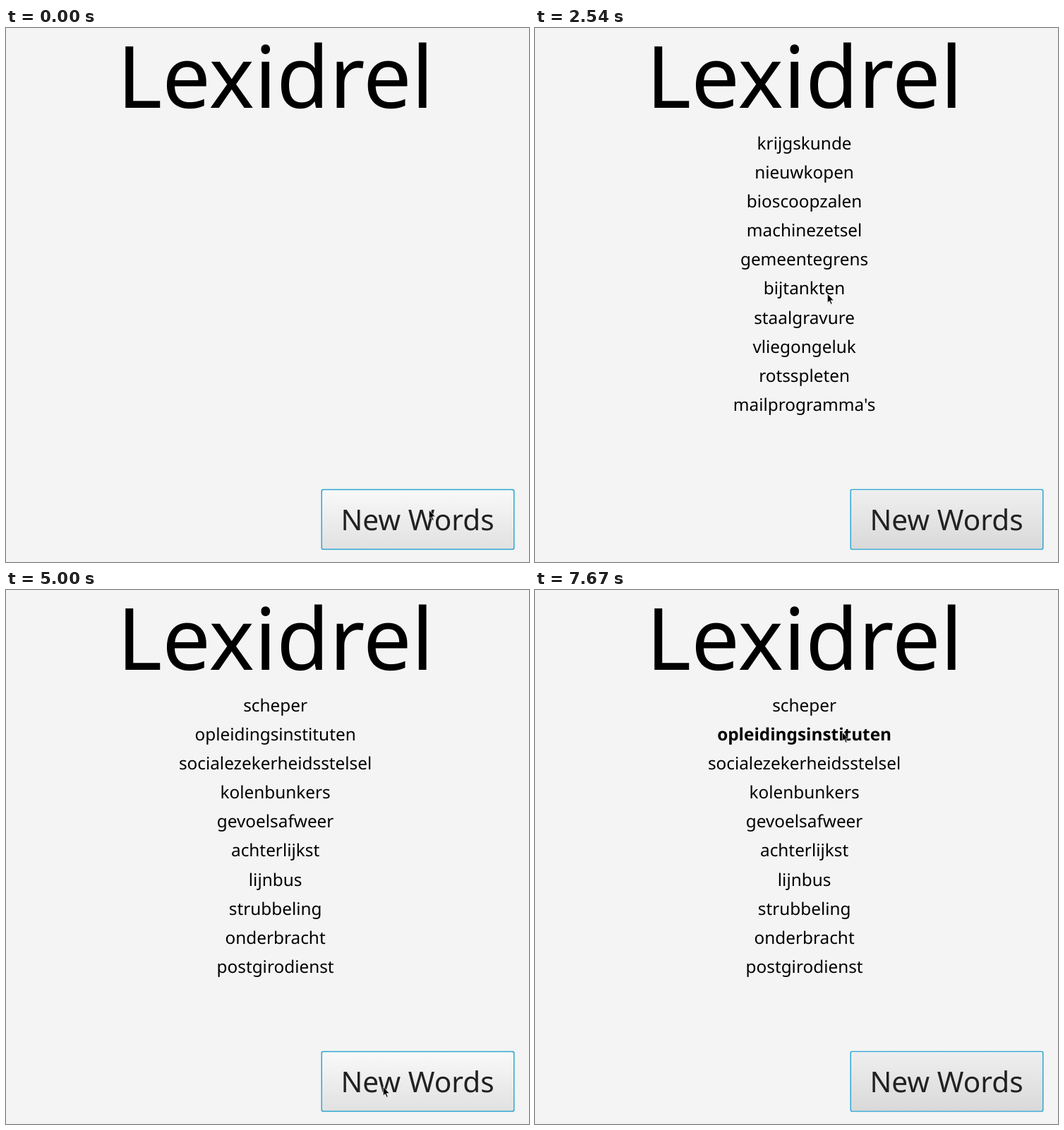
Write an HTML page that moves like this. It is 741 px wide and 756 px high and loops after 8 s.

```html
<!DOCTYPE html>
<html lang="en">
<head>
<meta charset="utf-8">
<title>New Words</title>
<style>
html, body { margin: 0; width: 741px; height: 756px; overflow: hidden; background: #f4f4f4; }
svg { display: block; }
text {
  font-family: "Noto Sans", "Open Sans", sans-serif;
  text-anchor: middle;
  text-rendering: geometricPrecision;
}
.title { font-size: 121.7px; }
.list { font-size: 24.33px; }
.label { font-size: 40.6px; fill: #212121; }

/* Everything changes in hard steps on one 8 s clock. */
.list, .idle, .armed, .cursor, .picked { animation: 8s step-end infinite; }
.first { animation-name: first; }
.second { animation-name: second; }
.idle { animation-name: idle; }
.armed { animation-name: armed; }
.cursor { animation-name: move; }
.first .picked { animation-name: pick-first; }
.second .picked { animation-name: pick-second; }

@keyframes first { 0%, 61.75%, 100% { opacity: 0 } 8.375% { opacity: 1 } }
@keyframes second { 0% { opacity: 0 } 61.75%, 100% { opacity: 1 } }
@keyframes pick-first { 0% { font-weight: 400 } 38.75%, 100% { font-weight: 700 } }
@keyframes pick-second { 0% { font-weight: 400 } 95.875%, 100% { font-weight: 700 } }
@keyframes armed {
  0%, 8.375%, 61.75%, 100% { opacity: 0 }
  6.25%, 59.625% { opacity: 1 }
}
@keyframes idle {
  0%, 47.5% { opacity: 0 }
  21.25%, 71.625%, 100% { opacity: 1 }
}
@keyframes move {
  0% { transform: translate(599px, 682px) }
  20% { transform: translate(591px, 681px) }
  21.25% { transform: translate(545px, 605px) }
  22.125% { transform: translate(470px, 500px) }
  23.375% { transform: translate(406px, 412px) }
  24.625% { transform: translate(410px, 393px) }
  26.75% { transform: translate(411px, 391px) }
  27.75% { transform: translate(411px, 388px) }
  28.75% { transform: translate(412px, 385px) }
  29.75% { transform: translate(413px, 381px) }
  30.75% { transform: translate(414px, 378px) }
  31.75% { transform: translate(414px, 376px) }
  45% { transform: translate(430px, 430px) }
  45.875% { transform: translate(468px, 545px) }
  46.625% { transform: translate(505px, 630px) }
  47.5% { transform: translate(524px, 666px) }
  49.25% { transform: translate(528px, 682px) }
  50.25% { transform: translate(532px, 695px) }
  51.25% { transform: translate(534px, 703px) }
  69.625% { transform: translate(531px, 693px) }
  70.625% { transform: translate(520px, 655px) }
  71.625% { transform: translate(488px, 545px) }
  72.625% { transform: translate(452px, 430px) }
  73.625% { transform: translate(423px, 335px) }
  74.625% { transform: translate(407px, 286px) }
  75.5% { transform: translate(390px, 290px) }
  76.5% { transform: translate(374px, 300px) }
  77.375% { transform: translate(369px, 312px) }
  78.375% { transform: translate(380px, 320px) }
  79.25% { transform: translate(397px, 322px) }
  80.5% { transform: translate(420px, 310px) }
  81.5% { transform: translate(445px, 285px) }
  82.5% { transform: translate(457px, 250px) }
  83.5% { transform: translate(456px, 220px) }
  84.5% { transform: translate(450px, 200px) }
  85.5% { transform: translate(446px, 191px) }
  87.5%, 100% { transform: translate(435px, 201px) }
}
</style>
</head>
<body>
<svg width="741" height="756" viewBox="0 0 741 756">
  <defs>
    <linearGradient id="hover" x2="0" y2="1"><stop stop-color="#f9f9f9"/><stop offset="1" stop-color="#e1e1e1"/></linearGradient>
    <linearGradient id="idle" x2="0" y2="1"><stop stop-color="#efefef"/><stop offset="1" stop-color="#d9d9d9"/></linearGradient>
    <linearGradient id="armed" x2="0" y2="1"><stop stop-color="#e2e2e2"/><stop offset="1" stop-color="#cbcbcb"/></linearGradient>
  </defs>

  <text class="title" x="381.8" y="112.5">Lexidrel</text>
  <g class="list first"></g>
  <g class="list second"></g>

  <rect x="446.5" y="652.7" width="274" height="86" rx="2.6" fill="#2fa6d2"/>
  <g id="face">
    <rect x="448" y="654.2" width="271" height="83" rx="1.6" fill="url(#hover)"/>
    <rect class="idle" x="448" y="654.2" width="271" height="83" rx="1.6" fill="url(#idle)"/>
    <rect class="armed" x="448" y="654.2" width="271" height="83" rx="1.6" fill="url(#armed)"/>
  </g>
  <text class="label" x="583" y="710.6">New Words</text>

  <path class="cursor" d="M.4 .4V13L3.2 10.4L5.3 15.2L7.1 14.4L5.1 9.7H9.2Z"
        fill="#000" stroke="#fff" stroke-width=".8" stroke-opacity=".8"/>
</svg>
<script>
const lists = {
  first: "krijgskunde nieuwkopen bioscoopzalen machinezetsel gemeentegrens bijtankten staalgravure vliegongeluk rotsspleten mailprogramma's",
  second: "scheper opleidingsinstituten socialezekerheidsstelsel kolenbunkers gevoelsafweer achterlijkst lijnbus strubbeling onderbracht postgirodienst"
};
const picked = ["bijtankten", "opleidingsinstituten"];

for (const [name, words] of Object.entries(lists)) {
  const group = document.querySelector("." + name);
  words.split(" ").forEach((word, i) => {
    const line = document.createElementNS("http://www.w3.org/2000/svg", "text");
    line.setAttribute("x", 381.6);
    line.setAttribute("y", Math.round(171.9 + 41.11 * i));
    if (picked.includes(word)) line.setAttribute("class", "picked");
    line.textContent = word;
    group.append(line);
  });
}
</script>
</body>
</html>
```
